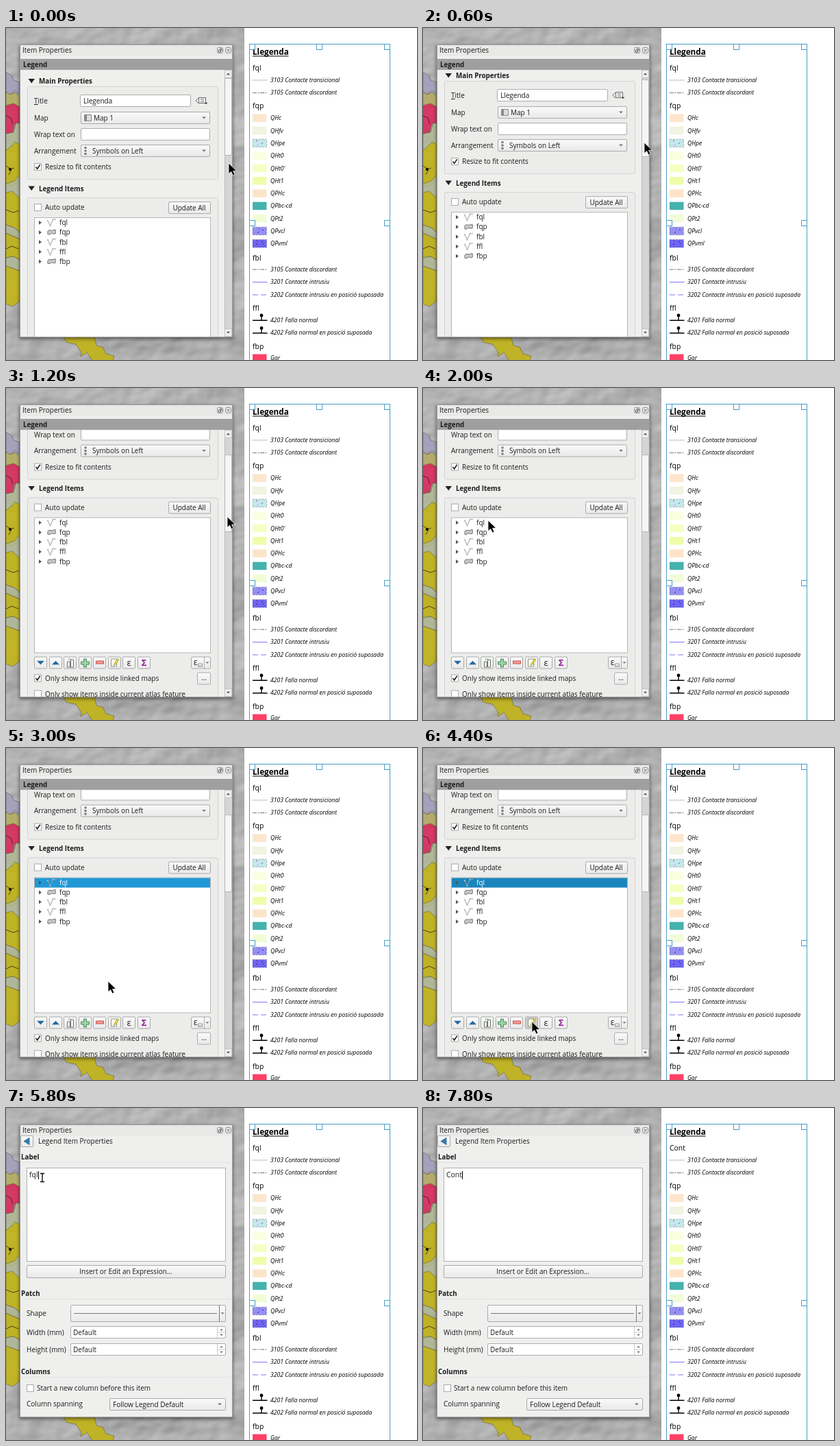
An HTML page that plays this animation: 600 px wide and 484 px high, repeating every 8 s.

```html
<!DOCTYPE html>
<html lang="en">
<head>
<meta charset="utf-8">
<title>Legend item editing</title>
<style>
html, body { margin: 0; width: 600px; height: 484px; overflow: hidden; background: #fff; }
svg { display: block; }
text { font: 10px "Open Sans", "Noto Sans", sans-serif; fill: #1c1c1c; white-space: pre; }
.b { font-weight: bold; font-size: 9.8px; }
.i { font-style: italic; font-size: 8.6px; fill: #000; }
.h { font-size: 10.4px; fill: #000; }
.t { font-weight: bold; font-size: 11.7px; fill: #000; }
.m { text-anchor: middle; }
</style>
</head>
<body>
<svg id="stage" width="600" height="484" viewBox="0 0 600 484"></svg>
<script>
const STEP = 200, LOOP = 8000;

// Markup helpers
const text = (x, y, s, cls = '', extra = '') => `<text x="${x}" y="${y}" class="${cls}" ${extra}>${s}</text>`;
const path = (d, fill = 'none', stroke = 'none', extra = '') =>
  `<path d="${d}" fill="${fill}" stroke="${stroke}" ${extra}/>`;
const box = (x, y, w, h, fill = '#fff', stroke = '#aaa', extra = '') =>
  `<rect x="${x + .5}" y="${y + .5}" width="${w - 1}" height="${h - 1}" fill="${fill}" stroke="${stroke}" ${extra}/>`;
const group = (id, body) => `<g id="${id}">${body}</g>`;
const field = (x, y, w, h) => box(x, y, w, h, '#fff', '#adadad', 'rx="1.5"');
const button = (x, y, w, h, extra = '') => box(x, y, w, h, 'url(#face)', '#aaa', 'rx="1.5" ' + extra);
const down = (x, y, r = 3, fill = '#777') => path(`M${x - r} ${y - r / 2}h${2 * r}l${-r} ${r}z`, fill);
const up = (x, y, r = 3, fill = '#777') => path(`M${x - r} ${y + r / 2}h${2 * r}l${-r} ${-r}z`, fill);
const combo = (x, y, w, label, indent) =>
  button(x, y, w, 18) + text(x + indent, y + 12.7, label) + down(x + w - 9, y + 9);
const check = (x, y, label, on, gap = 16) => box(x, y, 11, 11, '#fff', '#aaa') +
  (on ? path(`M${x + 2.5} ${y + 5.5}l2.2 2.8 4-6`, 'none', '#222', 'stroke-width="1.6"') : '') +
  text(x + gap, y + 9, label);
const heading = (y, label) => path(`M32.5 ${y - 7}h9.5l-4.75 6.5z`, '#222') + text(48, y, label, 'b');

const defs = `<defs>
  <linearGradient id="face" x2="0" y2="1"><stop stop-color="#fafafa"/><stop offset="1" stop-color="#e9e9e9"/></linearGradient>
  <filter id="relief" x="0" y="0" width="1" height="1" color-interpolation-filters="sRGB">
    <feTurbulence type="fractalNoise" baseFrequency=".009 .013" numOctaves="4" seed="8"/>
    <feDiffuseLighting surfaceScale="3.5" lighting-color="#f0f0f0"><feDistantLight azimuth="225" elevation="47"/></feDiffuseLighting>
  </filter>
  <filter id="blur"><feGaussianBlur stdDeviation="2"/></filter>
  <pattern id="hatch" width="3" height="3" patternUnits="userSpaceOnUse">
    <rect width="3" height="3" fill="#d9f3f6"/><path d="M0 0l3 3" stroke="#8cc9d2" stroke-width=".8"/></pattern>
  <clipPath id="view"><rect x="21" y="61" width="298" height="389"/></clipPath>
  <clipPath id="land"><rect width="348" height="484"/></clipPath>
</defs>`;

function map() {
  const lilac = '#a29fbd', red = '#d9285a', sand = '#b5ad62', sage = '#b0b895', yellow = '#c2b414';
  const areas = [
    ['M0 64l8 5 3 7 9 3v18l-7-6-7 6-6-4z', lilac],
    ['M0 93l6 4 7-3 7 6v18l-9-4-11 3z', sand],
    ['M0 113l11-3 9 5v24l-7 1-3 12-10 3z', red],
    ['M0 154l11-2 4-14 5 1v42l-20-3z', sage],
    ['M0 178l8-6 5-6 7 4v50l-8 9-12 3z', yellow],
    ['M0 227l12-4 8-9v42l-9 8-11-3z', sage],
    ['M0 240l9-2 11 10v50l-8-7-12-4z', yellow],
    ['M0 287l12 4 8 7v10l-20-9z', sage],
    ['M0 299l20 9v30l-9-5-11 2z', yellow],
    ['M0 335l11-2 9 5v16l-20-7z', sage],
    ['M0 347l20 7v44l-11 8-9-4z', yellow],
    ['M84 450l4 8 14 3 8 12-1 6 9-6 8 12h30l2-7-12-3-5-10-9-2-3-13z', yellow]
  ];
  return '<g clip-path="url(#land)"><rect width="348" height="484" fill="#aaa" filter="url(#relief)"/>' +
    areas.map(([d, fill]) => path(d, fill, '#55553a', 'stroke-width=".6" opacity=".88"')).join('') +
    path('M0 201l8 5-4 8M6 206l6-2M0 128l7 3 3 9M0 265l11 4 8-3M0 322l9-4 9 4', 'none', '#222', 'stroke-width=".8"') +
    '<circle cx="6" cy="206" r="2"/></g>';
}

function legend() {
  let s = '<rect x="348" width="252" height="484" fill="#fff"/>';
  const swatch = (y, fill, label, extra = '') =>
    `<rect x="360" y="${y - 5.5}" width="20.5" height="11.5" fill="${fill}" ${extra}/>` + text(386, y + 3.3, label, 'i');
  const line = (y, color, label, dash, w = 1) =>
    path(`M360 ${y + .5}h21.5`, 'none', color, `stroke-width="${w}" stroke-dasharray="${dash}"`) + text(386, y + 3.3, label, 'i');
  const head = (y, label, id = '') => text(360, y + 4, label, 'h', id);

  s += text(360, 38.7, 'Llegenda', 't') + path('M360 41h52.5', 'none', '#000', 'stroke-width="1.2"');
  s += head(58, 'fql', 'id="legendName"');
  s += line(75.5, '#555', '3103 Contacte transicional', '1 1', .8);
  s += line(94, '#555', '3105 Contacte discordant', '6 1.5 2 1.5', .8);
  s += head(113, 'fqp');
  const dashed = 'stroke="#445" stroke-width=".5" stroke-opacity=".7" stroke-dasharray="3 1.5"';
  [['QHc', '#fde5cd'], ['QHfv', '#f0f4e1'], ['QHpe', 'url(#hatch)', dashed], ['QHt0', '#f8ffdf'],
   ['QHt0’', '#f6ffc2'], ['QHt1', '#effdab'], ['QPHc', '#fde4c8'], ['QPbc-cd', '#45b1ad'],
   ['QPt2', '#f2fbd8'], ['QPvcl', '#978ff6', dashed], ['QPvml', '#6f64f4', dashed]]
    .forEach(([label, fill, extra], k) => s += swatch(131 + 18.3 * k, fill, label, extra));
  s += path('M367 299l2-2m5-3l2 1m-7-2h1m-5 23l2-2m6-2l2-1m-9-1h1m8 5h1', 'none', '#223', 'stroke-width=".9"');
  s += path('M365 165l2-1m6 5l2-2m-8 4h1', 'none', '#345', 'stroke-width=".8"');
  s += head(334.5, 'fbl');
  s += line(351.5, '#555', '3105 Contacte discordant', '6 1.5 2 1.5', .8);
  s += line(370, '#6a6af0', '3201 Contacte intrusiu', 'none', .9);
  s += line(388.5, '#6a6af0', '3202 Contacte intrusiu en posició suposada', '8 4', .9);
  s += head(408, 'ffl');
  [[425.5, '4201 Falla normal'], [444, '4202 Falla normal en posició suposada']].forEach(([y, label]) =>
    s += path(`M360 ${y + .7}h21.5M373 ${y + .7}v-7`, 'none', '#000', 'stroke-width="1.4"') +
      `<circle cx="373" cy="${y - 6.5}" r="2.4"/>` + text(386, y + 3.3, label, 'i'));
  s += head(463.5, 'fbp') + swatch(481, '#fd4266', 'Gar');

  s += path('M355.5 490V23.5H560.5V490', 'none', '#4a9cc9');
  [[355, 23], [453, 23], [552, 23], [355, 280], [552, 280]].forEach(([x, y]) =>
    s += box(x, y, 9, 9, '#fff', '#4a9cc9', 'fill-opacity=".75"'));
  return s;
}

function frame() {
  return '<rect x="19" y="25" width="313" height="429" opacity=".4" filter="url(#blur)"/>' +
    box(20, 24, 311, 427, '#efefee', '#9a9a9a') +
    '<rect x="21" y="25" width="309" height="16" fill="#e9e9e8"/>' + text(24, 36.3, 'Item Properties') +
    [308, 320].map(x => box(x, 28, 9, 9, '#eee', '#8a8a8a', 'rx="2"')).join('') +
    path('M310.5 32h3v3h-3zM312 30.500h3v3M322.500 30.500l4 4m0-4l-4 4', 'none', '#444', 'stroke-width=".9"');
}

function toolbar() {
  const xs = [41, 63, 84, 106, 127, 149, 170, 192];
  let s = xs.map((x, k) => button(x, 479, 19, 18, k == 5 ? 'id="editButton"' : '')).join('');
  s += down(50.5, 488, 5.5, '#27699f') + up(72.5, 488, 5.5, '#27699f');
  s += path('M89.5 486.5h4v8h-4zM94.5 483.5h4v11h-4zM91 484l2-2 2 2', '#f4f4f4', '#68766a');
  s += path('M113.5 482.5h4v4h4v4h-4v4h-4v-4h-4v-4h4z', '#9fd3a8', '#3f9150');
  s += path('M131.5 485.5h11v4h-11z', '#f0a09a', '#d3483f');
  s += path('M153.5 482.5h8v11h-8z', '#fdfdf0', '#8e9480') +
    path('M157 492l1-3 5-7 2 1.5-5 7z', '#e9d33b', '#8b8b2a', 'stroke-width=".6"');
  s += text(179.5, 492, 'ε', 'm', 'style="font-size:13px"') +
    text(201.5, 492.5, 'Σ', 'm b', 'style="font-size:13px;fill:#8a1a93"');
  s += button(270, 479, 29, 18) + path('M289.5 479v18', 'none', '#aaa') +
    text(276.5, 491, 'ε', 'm', 'style="font-size:12px"') +
    path('M280.5 489.5h6v4h-6zM282 492v2m3-2v2', 'none', '#999') + down(294, 488, 2.5);
  return s;
}

function listPanel() {
  let s = box(31, 85, 279, 136, '#ececeb', '#d2d2d2', 'rx="2"') + box(31, 247, 279, 330, '#ececeb', '#d2d2d2', 'rx="2"');
  s += heading(81, 'Main Properties');
  s += text(41, 110, '<tspan text-decoration="underline">T</tspan>itle') + field(108, 97, 162, 18) + text(113, 110, 'Llegenda');
  s += path('M281.5 101.5h10v8h-10zM284 104h5m-5 3h5M281 102l-4 4 4 4', '#f5f5f5', '#666') + down(292, 110, 2.5, '#444');
  s += text(41, 134.5, 'Map') + combo(109, 122, 189, 'Map 1', 19) +
    path('M114.5 126.5h10v9h-10z', '#dcdcdc', '#888') + path('M115 127h3v8h-3z', '#8b8b8b');
  s += text(41, 159, 'Wrap text on') + field(109, 146, 189, 18);
  s += text(41, 182.5, 'Arrangement') + combo(109, 170, 189, 'Symbols on Left', 17) +
    path('M114.5 173h3v3h-3zm0 4.5h3v3h-3zm0 4.5h3v3h-3z', '#777');
  s += check(41, 197, 'Resize to fit contents', true);
  s += heading(237.5, 'Legend Items') + check(41, 256, 'Auto update', false);
  s += button(237, 253, 62, 18) + text(267.5, 265.5, 'Update All', 'm');
  s += box(41, 276, 258, 198, '#fff', '#b5b5b5') + '<rect id="selected" x="42" y="277" width="256" height="14"/>';
  ['fql', 'fqp', 'fbl', 'ffl', 'fbp'].forEach((name, k) => {
    const y = 283.7 + 14.2 * k;
    s += path(`M48 ${y - 3}l4 3-4 3z`, '#555');
    s += k % 3 == 1
      ? path(`M61 ${y + 3}q-1-7 3-6 4 1 8-1 1 3 0 6-4 1-5-1-3 3-6 2z`, '#c9c9c9', '#777')
      : path(`M61 ${y - 3}l3.5 7.5 4-9h4.5`, 'none', '#999') + path(`M60 ${y - 4}h2v2h-2zm3.5 7.5h2v2h-2zm4-9h2v2h-2z`, '#bbb');
    s += text(78, y + 3.5, name, '', k ? '' : 'id="rowName"');
  });
  s += toolbar();
  s += check(41, 505, 'Only show items inside linked maps', true) + button(279, 502, 20, 18) + text(289, 513, '...', 'm');
  s += check(41, 528, 'Only show items inside current atlas feature', false);

  const bar = '<rect x="319" y="61" width="11" height="389" fill="#d5d5d5"/>' + path('M319.5 61v389', 'none', '#bbb') +
    box(319, 61, 11, 12, '#eee', '#c4c4c4') + box(319, 438, 11, 12, '#eee', '#c4c4c4') +
    up(324.5, 67, 2.5, '#444') + down(324.5, 444, 2.5, '#444') +
    group('thumb', box(319, 73, 11, 113, '#f5f5f5', '#b5b5b5'));
  return '<rect x="21" y="45" width="309" height="16" fill="#9f9f9f"/>' + text(25, 56.5, 'Legend', 'b') +
    `<g clip-path="url(#view)">${group('content', s)}</g>` + bar;
}

function itemPanel() {
  const spin = y => field(94, y, 227, 18) + text(98, y + 12.7, 'Default') +
    path(`M308.5 ${y + 1}v16M309 ${y + 9}h11`, 'none', '#ccc') + up(314.5, y + 5, 2.5) + down(314.5, y + 13, 2.5);
  let s = button(21, 40, 19, 17) + path('M34 43.5v10l-8-5z', '#2f7fb8', '#1d5b8a', 'stroke-width=".7"') +
    text(47, 52.3, 'Legend Item Properties');
  [[74.5, 'Label'], [273.5, 'Patch'], [387.5, 'Columns']].forEach(([y, label]) =>
    s += text(22, y, label, 'b') + path(`M22 ${y + 5}h306`, 'none', '#e2e2e2'));
  s += box(30, 87, 291, 137, '#fff', '#b0b0b0');
  s += '<rect id="mark" y="92" height="13" fill="#2a97d4"/>' + text(34, 101, '', '', 'id="entry" style="font-size:10.4px"') +
    '<rect id="caret" y="92" width="1" height="12"/>';
  s += button(30, 229, 291, 19) + text(175, 242, 'Insert or Edit an Expression…', 'm');
  s += text(30, 303, 'Shape') + button(94, 287, 227, 25) +
    path('M99 299.5h209M311.5 287v25', 'none', '#777') + down(316, 299.5, 2.5);
  s += text(30, 331, 'Width (mm)') + spin(318) + text(30, 355.5, 'Height (mm)') + spin(343);
  s += check(30, 403, 'Start a new column before this item', false, 15);
  s += text(30, 435, 'Column spanning') + combo(151, 423, 170, 'Follow Legend Default', 5);
  return s;
}

const stage = document.getElementById('stage');
stage.innerHTML = defs + map() + legend() + frame() + group('listPanel', listPanel()) + group('itemPanel', itemPanel()) +
  group('arrow', path('M0 0V15.5L3.7 12.5 6.2 18 9 16.7 6.6 11.5 11.5 11z', '#000', '#fff', 'stroke-width=".8"')) +
  group('beam', path('M-3-5.5h2.5l.5.5.5-.5H3M0-5V6M-3 6.5h6', 'none', '#000', 'stroke-width="1.3"'));

const $ = id => document.getElementById(id);
const show = (id, on) => $(id).setAttribute('display', on ? 'inline' : 'none');
const move = (id, x, y) => $(id).setAttribute('transform', `translate(${x} ${y})`);
const at = (keys, t) => keys.filter(k => k[0] <= t).pop();

// Time, x, y of the pointer
const pointer = [
  [0, 325, 197], [200, 324, 184], [400, 323, 168], [600, 323, 167], [800, 323, 174], [1000, 323, 182], [1200, 323, 187.7],
  [1400, 300, 189], [1600, 225, 192], [1800, 140, 193], [2000, 95, 193], [2200, 88, 192],
  [2600, 97, 215], [2800, 125, 285], [3000, 149, 340], [3200, 158, 375], [3400, 161, 394], [3600, 160, 400], [3800, 159, 399],
  [4600, 157, 385], [4800, 148, 310], [5000, 138, 215], [5200, 129, 150], [5400, 123, 127],
  [5600, 84, 112], [5800, 53, 101], [6000, 44, 100], [6400, 37, 99]
];
const typed = [[0, 'fql'], [7000, 'C'], [7400, 'Co'], [7600, 'Con'], [7800, 'Cont']];

function draw(now) {
  const t = Math.floor(now % LOOP / STEP) * STEP;
  const [, x, y] = at(pointer, t), name = at(typed, t)[1];
  const editing = t >= 4600, pressed = t >= 4400, chosen = t >= 2200;

  // The pointer drags the scroll bar thumb
  const drag = t < 600 ? 0 : t < 1200 ? y - 165 : 22.7;
  move('content', 0, -Math.min(87.5, drag * 3.95));
  move('thumb', 0, drag * 1.06);
  show('listPanel', !editing);
  show('itemPanel', editing);

  show('selected', chosen);
  $('selected').setAttribute('fill', pressed ? '#1a85bd' : t < 2600 ? '#38a5df' : '#2198d5');
  $('rowName').style.fill = chosen ? '#fff' : '';
  $('editButton').setAttribute('fill', pressed ? '#cfcfcf' : 'url(#face)');

  $('entry').textContent = $('legendName').textContent = name;
  const marking = t >= 6000 && t < 7000;
  const from = marking && t < 6400 ? 4 : 0;
  show('mark', marking);
  $('entry').style.fill = marking && t >= 6400 ? '#fff' : '';
  if (editing) {
    const width = $('entry').getComputedTextLength();
    $('mark').setAttribute('x', 34 + from);
    $('mark').setAttribute('width', width - from);
    $('caret').setAttribute('x', Math.round(34 + (marking ? from : width)));
  }

  const overText = t >= 5200;
  show('arrow', !overText);
  show('beam', overText && t < 7000);
  move(overText ? 'beam' : 'arrow', x, y);
}

function tick() {
  draw(performance.now());
  requestAnimationFrame(tick);
}
tick();
</script>
</body>
</html>
```
